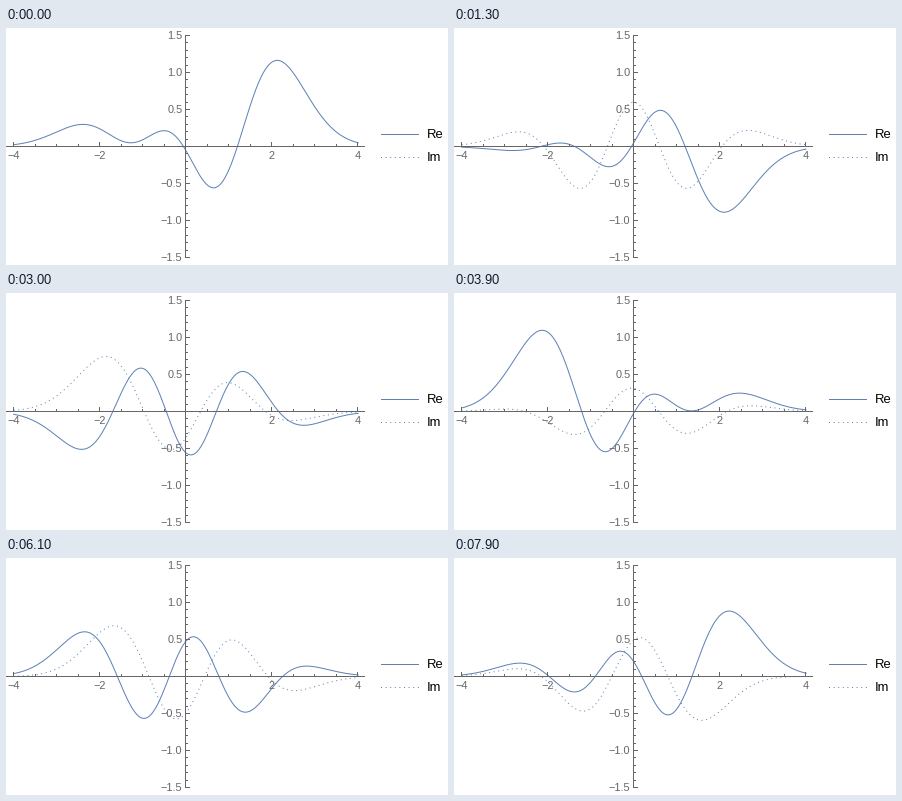
A matplotlib script that plays this animation: 442 px wide and 237 px high, repeating every 8 s.

```python
import numpy as np
import matplotlib.pyplot as plt
from matplotlib.animation import FuncAnimation

W, H, DPI = 442, 237, 64
FRAMES, INTERVAL = 80, 100
PX = 72 / DPI                 # points per pixel
BLUE, GRAY = "#5e81b5", "#666666"
X0, Y0, SX, SY = 179.5, 118.5, 43, 74

plt.rcParams["font.family"] = "Liberation Sans"
fig = plt.figure(figsize=(W / DPI, H / DPI), dpi=DPI, facecolor="white")
ax = fig.add_axes([0, 0, 1, 1])
ax.set_xlim(0, W)
ax.set_ylim(H, 0)
ax.axis("off")


def stroke(xs, ys, color=GRAY, z=3, **kw):
    # Coordinates already sit on pixel centres, so snapping is off
    return ax.plot(xs, ys, color=color, lw=PX, zorder=z, snap=False, **kw)[0]


def label(x, y, text, size=11, color=GRAY, **kw):
    ax.text(x, y, text, fontsize=size * PX, color=color, zorder=3, **kw)


def minus(text):
    return text.replace("-", "\u2212")


def draw_axes():
    stroke([0.5, 358.5], [Y0, Y0])
    stroke([X0, X0], [7.5, 229.5])
    for k in range(-8, 9):
        x = np.floor(X0 + SX * k / 2) + 0.5
        major = k % 4 == 0
        stroke([x, x], [Y0, Y0 - (4 if major else 2)])
        if major and k:
            label(x, 131, minus(str(k // 2)), ha="center")
    for k in range(-15, 16):
        y = np.floor(Y0 - SY * k / 10) + 0.5
        major = k % 5 == 0
        stroke([X0, X0 + (4 if major else 2)], [y, y])
        if major and k:
            label(176.5, y + 3.5, minus(f"{k / 10:.1f}"), ha="right")


# Oscillator states n = 2, 3, 4 with energies n + 1/2
x = np.linspace(-4, 4, 500)
gauss = np.exp(-x**2 / 2) / np.sqrt(3)
states = np.array([
    gauss * (4 * x**2 - 2) / np.sqrt(8),
    gauss * (8 * x**3 - 12 * x) / np.sqrt(48),
    gauss * (16 * x**4 - 48 * x**2 + 12) / np.sqrt(384),
])
energy = np.array([2.5, 3.5, 4.5])

DOTS = dict(dashes=(1, 3.6), dash_capstyle="butt")
draw_axes()
curve_x = 179.9 + 43.05 * x
re_line = stroke(curve_x, Y0 + 0 * x, BLUE, 2)
im_line = stroke(curve_x, Y0 + 0 * x, BLUE, 2, **DOTS)

stroke([375.5, 412.5], [106.5, 106.5], BLUE)
stroke([375, 413], [129.5, 129.5], BLUE, **DOTS)
label(420.5, 110, "Re", 13, "black")
label(420.5, 133, "Im", 13, "black")


def update(i):
    t = 2 * np.pi * i / 90
    psi = np.exp(-1j * energy * t) @ states
    re_line.set_ydata(Y0 - SY * psi.real)
    im_line.set_ydata(Y0 - SY * psi.imag)
    return re_line, im_line


anim = FuncAnimation(fig, update, frames=FRAMES, interval=INTERVAL,
                     repeat=True, repeat_delay=0)
plt.show()
```
